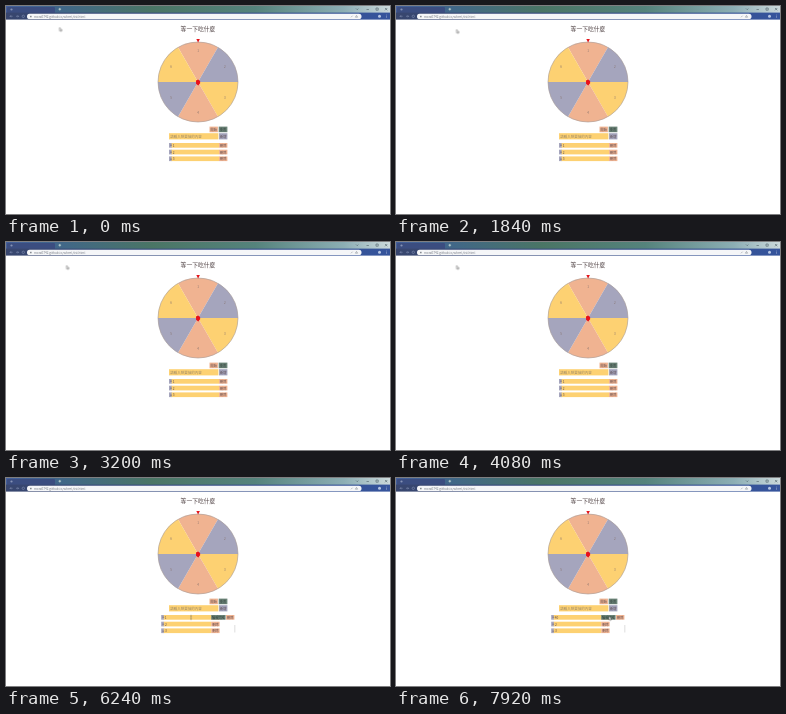
These frames come from a looping animation (384 px wide and 208 px high, 8 s). An HTML page:

```html
<!DOCTYPE html>
<html lang="zh-Hant">
<head>
<meta charset="utf-8">
<title>等一下吃什麼</title>
<style>
html, body { margin: 0; height: 100%; overflow: hidden; background: #fff; }
svg { display: block; width: 100vw; height: 100vh; }
text { font-family: "Noto Sans CJK TC", "Noto Sans CJK", "Noto Sans", sans-serif; dominant-baseline: central; }
.mid { text-anchor: middle; }
#view, #edit, .v1, .v2, #arrow, #beam { animation: 8s step-end infinite; }
#view { animation-name: view; }
#edit { animation-name: edit; }
.v1 { animation-name: before; }
.v2 { animation-name: after; }
#arrow { animation-name: arrow; }
#beam { animation-name: beam; }
#mouse { animation: move 8s linear infinite; }
@keyframes view { 0% { opacity: 1; } 68%, 100% { opacity: 0; } }
@keyframes edit { 0% { opacity: 0; } 68%, 100% { opacity: 1; } }
@keyframes before { 0% { opacity: 1; } 90%, 100% { opacity: 0; } }
@keyframes after { 0% { opacity: 0; } 90%, 100% { opacity: 1; } }
@keyframes arrow { 0% { opacity: 1; } 68% { opacity: 0; } 95%, 100% { opacity: 1; } }
@keyframes beam { 0% { opacity: 0; } 68% { opacity: 1; } 95%, 100% { opacity: 0; } }
@keyframes move {
  0%, 3.9% { transform: translate(53.5px, 21.5px); }
  5%, 54% { transform: translate(60.5px, 23.5px); }
  57% { transform: translate(142px, 176px); }
  61%, 65% { transform: translate(206.5px, 137.5px); }
  66%, 78% { transform: translate(185px, 139.5px); }
  80%, 90% { transform: translate(187px, 138.5px); }
  96%, 100% { transform: translate(213px, 138.5px); }
}
</style>
</head>
<body>
<svg id="stage" viewBox="0 0 384 208" preserveAspectRatio="none">
  <defs>
    <linearGradient id="strip">
      <stop offset="0" stop-color="#435f9c"/>
      <stop offset=".13" stop-color="#40668a"/>
      <stop offset=".38" stop-color="#4a7565"/>
      <stop offset=".65" stop-color="#55837c"/>
      <stop offset=".88" stop-color="#8caeb4"/>
      <stop offset="1" stop-color="#cbd9dc"/>
    </linearGradient>
    <linearGradient id="bar">
      <stop offset="0" stop-color="#38466e"/>
      <stop offset="1" stop-color="#35549c"/>
    </linearGradient>
  </defs>
  <rect width="384" height="208" fill="#fff"/>

  <g id="browser">
    <rect width="384" height="7" fill="url(#strip)"/>
    <path d="M1 7V2q0-1 1-1h46q1 0 1 1v5z" fill="#3b4d80"/>
    <circle cx="5.5" cy="3.5" r="1.1" fill="#8793b5"/>
    <path d="M52.5 3.2h2.6M53.8 1.9v2.6" stroke="#d5e6d8" stroke-width=".7"/>
    <path d="M350 2.5l1.2 1.2 1.2-1.2M360.5 3.5h2.4M370 2h2.2v2.2H370zM379 2l2.3 2.3M381.3 2L379 4.3"
      fill="none" stroke="#4c6068" stroke-width=".6"/>
    <rect y="6.6" width="384" height="7" fill="url(#bar)"/>
    <rect x="21" y="7.8" width="334.5" height="5.2" rx="2.6" fill="#f5f6f8"/>
    <path d="M4 10.3h2.6M4 10.3l1-1M4 10.3l1 1M10 10.3h2.6M12.6 10.3l-1-1M12.6 10.3l-1 1"
      fill="none" stroke="#8e9abc" stroke-width=".5"/>
    <circle cx="17.3" cy="10.3" r="1.2" fill="none" stroke="#8e9abc" stroke-width=".5"/>
    <rect x="24" y="9.8" width="1.6" height="1.5" fill="#858a90"/>
    <text x="28" y="10.3" font-size="3.1" fill="#747980">mora0742.github.io/wheel/list.html</text>
    <path d="M345 11.3l1.6-1.6M350.5 9.4l1.1 1.8h-2.2z" stroke="#788088" stroke-width=".5" fill="none"/>
    <circle cx="373.5" cy="10.3" r="1.5" fill="#b7c6e4"/>
    <path d="M380.5 8.7v3.2" stroke="#c1cce5" stroke-width=".6" stroke-dasharray=".7 .6"/>
  </g>

  <text class="mid" x="192" y="22.5" font-size="5.8" fill="#493b3d">等一下吃什麼</text>
  <g id="wheel"></g>
  <path d="M190.3 33h3.6l-1.8 3.6z" fill="#e3151b"/>
  <path d="M190 74.6l2.1-1.2 2 1.5v2.3l-1.7 2.2-2.3-1.5z" fill="#e8101b"/>
  <g id="form"></g>
  <g id="view"></g>
  <g id="edit"></g>

  <g id="mouse">
    <path id="arrow" d="M0 0v3.5l.9-.8.6 1.3.7-.3-.6-1.2h1.1z" fill="#fff" stroke="#444" stroke-width=".4"/>
    <path id="beam" d="M-.7-1.8h1.4M0-1.8v3.6M-.7 1.8h1.4" fill="none" stroke="#555" stroke-width=".45"/>
  </g>
</svg>
<script>
const ORANGE = '#f0b391', PURPLE = '#a5a5bd', YELLOW = '#fdd172', GREEN = '#6c8478', INK = '#57464a';
const NS = 'http://www.w3.org/2000/svg';
const byId = id => document.getElementById(id);

function add(parent, tag, attrs, content = '') {
  const el = document.createElementNS(NS, tag);
  for (const key in attrs) el.setAttribute(key, attrs[key]);
  el.textContent = content;
  return parent.appendChild(el);
}
const box = (g, x, y, width, height, fill) => add(g, 'rect', { x, y, width, height, fill });
const label = (g, x, y, str, cls = '', fill = INK, size = 3.2) =>
  add(g, 'text', { x, y, 'font-size': size, fill, class: cls }, str);

function button(g, x, y, w, h, fill, str, ink = INK) {
  box(g, x, y, w, h, fill);
  label(g, x + w / 2, y + h / 2, str, 'mid', ink);
}

function drawWheel() {
  const g = byId('wheel'), cx = 192, cy = 76, r = 40;
  const at = (deg, dist) => {
    const a = (deg - 90) * Math.PI / 180;
    return [cx + dist * Math.cos(a), cy + dist * Math.sin(a)];
  };
  for (let i = 0; i < 6; i++) {
    const mid = i * 60;
    add(g, 'path', {
      d: `M${cx} ${cy}L${at(mid - 30, r)}A${r} ${r} 0 0 1 ${at(mid + 30, r)}Z`,
      fill: [ORANGE, PURPLE, YELLOW][i % 3]
    });
    const [x, y] = at(mid, 31);
    label(g, x, y, i + 1, 'mid', '#85706b', 3);
  }
  add(g, 'circle', { cx, cy, r, fill: 'none', stroke: '#a79b98', 'stroke-width': .6 });
}

function drawRow(g, x, y, str) {
  box(g, x, y, 3, 4.7, PURPLE);
  box(g, x + 2.6, y, 47.4, 4.7, YELLOW);
  label(g, x + .7, y + 2.35, '≡', '', INK, 2.6);
  if (str) label(g, x + 3.7, y + 2.35, str);
  button(g, x + 50, y, 8.4, 4.7, ORANGE, '刪除');
}

function drawForm() {
  const g = byId('form');
  button(g, 203.5, 120.6, 8.4, 5.6, ORANGE, '開始');
  button(g, 212.7, 120.6, 8.7, 5.6, GREEN, '重置', '#2f3d38');
  box(g, 163, 127.2, 49.4, 6.2, YELLOW);
  label(g, 164.3, 130.3, '請輸入想要抽的內容', '', '#9c8968', 3.5);
  button(g, 213, 127.2, 8.4, 6.2, PURPLE, '新增');
}

function drawLists() {
  const view = byId('view'), edit = byId('edit');
  [137, 143.7, 150.4].forEach((y, i) => {
    drawRow(view, 163, y, i + 1);
    drawRow(edit, 155.2, y, i && i + 1);
  });
  label(edit, 158.8, 139.35, '1', 'v1');
  label(edit, 158.8, 139.35, '40', 'v2');
  button(edit, 205.2, 137, 14.4, 4.7, GREEN, '編輯完成', '#2f3d38');
  button(edit, 220, 137, 8.4, 4.7, ORANGE, '刪除');
  box(edit, 228.6, 147, .6, 7.5, '#c5c5c5');
}

drawWheel();
drawForm();
drawLists();
</script>
</body>
</html>
```
